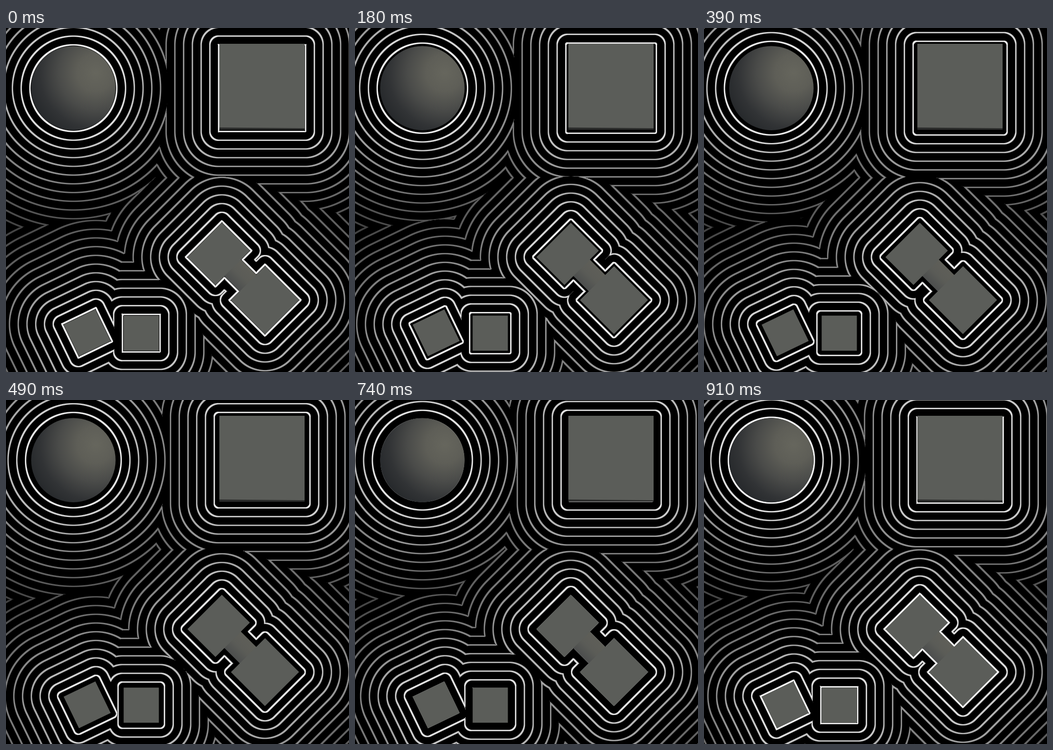
Write an HTML page with a canvas that moves like this. It is 672x676 px and loops after 970 ms.

```html
<!DOCTYPE html>
<html lang="en">
<head>
<meta charset="utf-8">
<title>Distance field</title>
<style>
html, body { margin: 0; width: 100%; height: 100%; overflow: hidden; background: #000; }
canvas { display: block; width: 672px; height: 676px; }
</style>
</head>
<body>
<canvas id="stage" width="672" height="676"></canvas>
<script>
const W = 672, H = 676, LOOP = 970, COUNT = 20, GAP = 17.15;
const INSET = 2.4, TILT = Math.PI / 4;
const FACE = '#5b5d59', EDGE = '#2a2b2a';
const ctx = document.getElementById('stage').getContext('2d');

const makeBox = (cx, cy, hw, hh = hw, angle = 0) => ({ cx, cy, hw, hh, angle });

const ball = { cx: 132, cy: 118.2, r: 85.1 };
const slab = makeBox(501.8, 118.2, 85.2);
const rod = makeBox(462, 489.3, 40, 25.2, TILT);
const blocks = [
  makeBox(159, 599, 36.9, 36.9, -0.45),
  makeBox(265, 599.7, 36.9),
  makeBox(416.6, 443.9, 41.2, 50.1, TILT),
  makeBox(507.4, 534.7, 49.5, 49.7, TILT)
];

function boxDistance({ cx, cy, hw, hh, angle }) {
  const c = Math.cos(angle), s = Math.sin(angle);
  return (x, y) => {
    const dx = x - cx, dy = y - cy;
    const qx = Math.abs(dx * c + dy * s) - hw;
    const qy = Math.abs(dy * c - dx * s) - hh;
    return Math.hypot(Math.max(qx, 0), Math.max(qy, 0)) + Math.min(Math.max(qx, qy), 0);
  };
}

const distances = [slab, rod, ...blocks].map(boxDistance);

function distance(x, y) {
  let d = Math.hypot(x - ball.cx, y - ball.cy) - ball.r;
  for (const f of distances) d = Math.min(d, f(x, y));
  return d;
}

// The field is static: keep distance, line spread and brightness per pixel.
const field = new Float32Array(W * H);
const spread = new Float32Array(W * H);
const glow = new Float32Array(W * H);
for (let y = 0, i = 0; y < H; y++) {
  for (let x = 0; x < W; x++, i++) {
    field[i] = distance(x + 0.5, y + 0.5);
    glow[i] = 250 * Math.exp(-0.0062 * Math.max(field[i], 0));
  }
}
// Lines widen with the screen-space slope, so diagonals are heavier.
for (let y = 0, i = 0; y < H; y++) {
  for (let x = 0; x < W; x++, i++) {
    const dx = field[i] - field[x ? i - 1 : i + 1];
    const dy = field[i] - field[y ? i - W : i + W];
    spread[i] = Math.max(0.7, Math.abs(dx) + Math.abs(dy));
  }
}

const image = ctx.createImageData(W, H);
const pixels = new Uint32Array(image.data.buffer);

function drawLines(shift) {
  for (let i = 0; i < pixels.length; i++) {
    const k = (field[i] - shift) / GAP;
    const off = Math.abs(k - Math.round(k)) * GAP / spread[i];
    const v = off < 1.8 ? glow[i] * Math.min(1, 1.8 - off) | 0 : 0;
    pixels[i] = 0xff000000 | v * 0x010101;
  }
  ctx.putImageData(image, 0, 0);
}

function shade(gradient, ...colors) {
  colors.forEach((color, i) => gradient.addColorStop(i / (colors.length - 1), color));
  return gradient;
}

const ballFill = shade(ctx.createRadialGradient(176, 88, 0, 176, 88, 146),
  '#66665d', '#5e5e57', '#4a4b49', '#313335', '#222528');
const rodFill = shade(ctx.createLinearGradient(0, rod.hh, 0, -rod.hh),
  '#4b4d4d', '#5b5c57', '#5f5f58');

function drawBox({ cx, cy, hw, hh, angle }, fill) {
  const w = hw - INSET, h = hh - INSET;
  ctx.save();
  ctx.translate(cx, cy);
  ctx.rotate(angle);
  ctx.fillStyle = fill;
  ctx.fillRect(-w, -h, 2 * w, 2 * h);
  ctx.restore();
}

function drawSlab() {
  const left = 418, top = 31, size = 167, bottom = 199.5;
  ctx.fillStyle = FACE;
  ctx.fillRect(left, top, size, bottom - top);
  ctx.fillStyle = EDGE;
  ctx.beginPath();
  ctx.moveTo(left, bottom - 4);
  ctx.lineTo(left + size, bottom - 2.5);
  ctx.lineTo(left + size, bottom);
  ctx.lineTo(left, bottom);
  ctx.fill();
}

function drawSolids() {
  ctx.fillStyle = ballFill;
  ctx.beginPath();
  ctx.arc(ball.cx, ball.cy, ball.r - INSET, 0, 2 * Math.PI);
  ctx.fill();
  drawSlab();
  drawBox(rod, rodFill);
  blocks.forEach(block => drawBox(block, FACE));
}

let shown = -1;
function frame(now) {
  const step = Math.floor(now % LOOP / LOOP * COUNT + 0.3) % COUNT;
  if (step !== shown) {
    shown = step;
    drawLines(GAP * step / COUNT);
    drawSolids();
  }
  requestAnimationFrame(frame);
}
frame(0);
</script>
</body>
</html>
```
